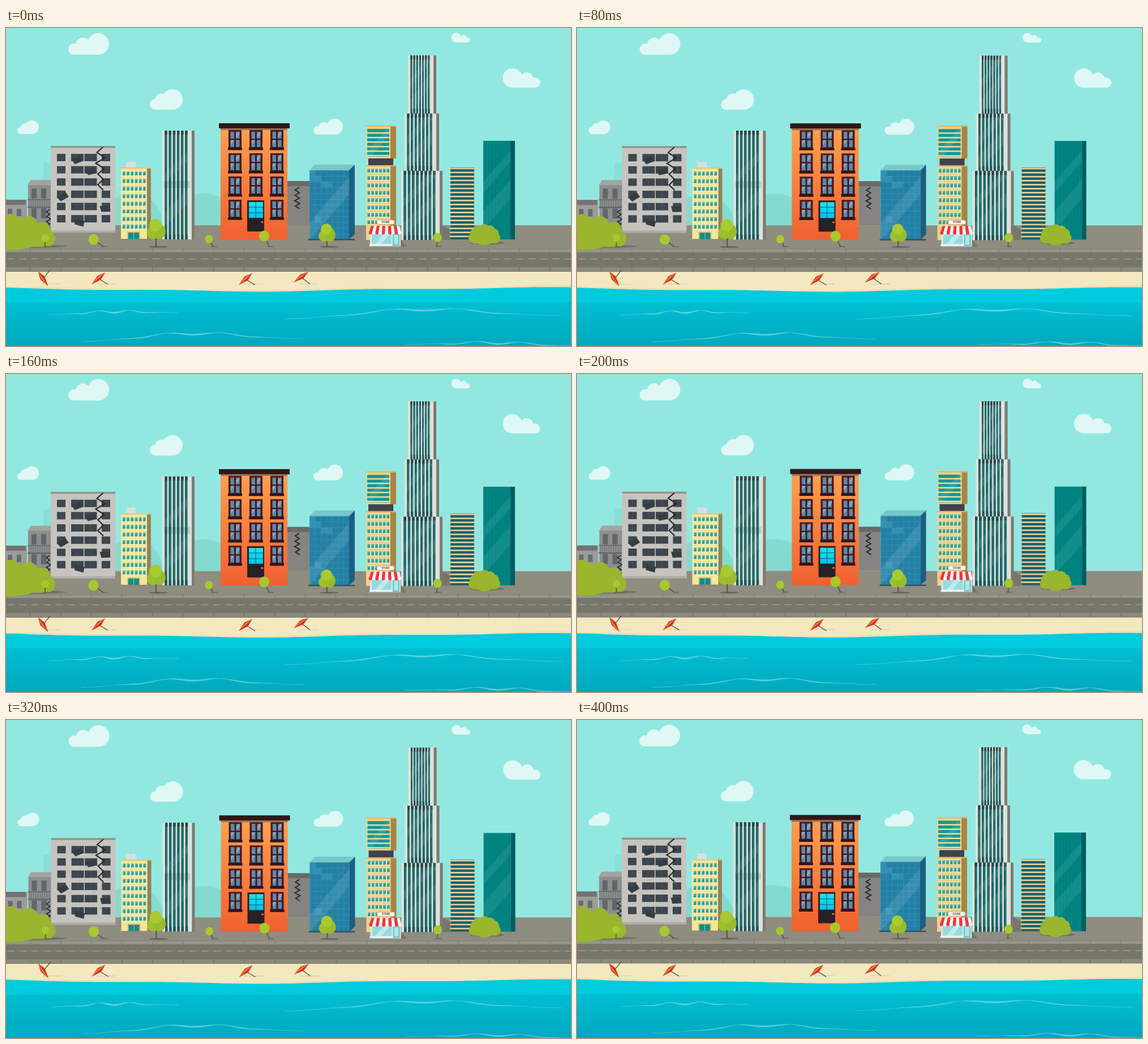
Animation, 998 px wide and 561 px high, one loop 0.44 s. Source, as an HTML page with a canvas:

```html
<!DOCTYPE html>
<html lang="en">
<head>
<meta charset="utf-8">
<title>Seaside street</title>
<style>
html, body { margin: 0; width: 100%; height: 100%; overflow: hidden; background: #92e8e0 }
canvas { display: block }
</style>
</head>
<body>
<canvas width="998" height="561"></canvas>
<script>
const c = document.querySelector('canvas').getContext('2d');
const TAU = Math.PI * 2;
let seed;

function random() {
  seed = seed * 16807 % 2147483647;
  return seed / 2147483647;
}

const rect = (x, y, w, h, fill) => { c.fillStyle = fill; c.fillRect(x, y, w, h); };
const band = (y, h, fill) => rect(-5, y, 1008, h, fill);

function trace(points) {
  c.beginPath();
  for (let i = 0; i < points.length; i += 2) c.lineTo(points[i], points[i + 1]);
}

function poly(points, fill) {
  trace(points);
  c.fillStyle = fill;
  c.fill();
}

function line(points, stroke, width = 1) {
  trace(points);
  c.strokeStyle = stroke;
  c.lineWidth = width;
  c.stroke();
}

function oval(x, y, rx, ry, fill) {
  c.beginPath();
  c.ellipse(x, y, rx, ry, 0, 0, TAU);
  c.fillStyle = fill;
  c.fill();
}

function fade(y0, y1, from, to) {
  const g = c.createLinearGradient(0, y0, 0, y1);
  g.addColorStop(0, from);
  g.addColorStop(1, to);
  return g;
}

function grid(x, y, cols, rows, dx, dy, cell) {
  for (let j = 0; j < rows; j++)
    for (let i = 0; i < cols; i++) cell(x + i * dx, y + j * dy, i, j);
}

// Diagonal reflection, clipped to a pane
function glare(x, y, w, h, at, size, alpha = .1) {
  c.save();
  c.beginPath();
  c.rect(x, y, w, h);
  c.clip();
  const a = y + at, b = a - w * 1.15;
  poly([x, a, x + w, b, x + w, b + size, x, a + size], `rgba(255,255,255,${alpha})`);
  c.restore();
}

// Three lumps on a flat base; dir -1 puts the large one on the left
function cloud(x, y, w, h, dir = 1) {
  c.save();
  c.translate(x + w / 2, y);
  c.scale(dir, 1);
  c.beginPath();
  const lump = (cx, r, cy) => {
    c.moveTo(cx - w / 2 + r, cy);
    c.arc(cx - w / 2, cy, r, 0, TAU);
  };
  lump(h * .26, h * .26, h * .74);
  lump(w * .36, h * .34, h * .55);
  lump(w - h / 2, h / 2, h / 2);
  c.rect(h * .26 - w / 2, h * .6, w - h * .76, h * .4);
  c.fillStyle = '#dff8f5';
  c.fill();
  c.restore();
}

function crack(x, y, height, sway, width) {
  seed = 11 + height;
  const points = [];
  for (let t = 0, side = 1; t <= height; t += height / 8, side = -side)
    points.push(x + side * sway * (.5 + random() / 2), y + t);
  line(points, '#272b2e', width);
}

function sky() {
  band(-5, 360, '#92e8e0');
  cloud(110, 9, 72, 38);
  cloud(254, 108, 58, 36);
  cloud(20, 163, 38, 24);
  cloud(543, 160, 52, 28);
  cloud(786.5, 8.5, 33, 17, -1);
  cloud(877.5, 71, 66, 34, -1);
  rect(66, 238, 14, 110, '#87e0d7');
  oval(222, 347, 55, 55, '#85dad0');
  oval(350, 348, 60, 56, '#85dad0');
}

function ground() {
  band(348, 42, '#8f8c80');
  band(389, 1, '#807d71');
  band(390, 6, '#95958a');
  band(395.5, 27, '#76766a');
  band(422, 8, '#8a897c');
  band(429, 1, '#77766a');
  for (let x = 2; x < 1000; x += 21.4) rect(x, 406.8, 13, 1, '#b0af9f');
  for (let x = 42; x < 1000; x += 54) {
    rect(x, 390, 1, 5.5, '#78786c');
    rect(x, 422, 1, 7, '#6c6c62');
  }
}

function shard(x, y, angle) {
  c.save();
  c.translate(x, y);
  c.rotate(angle);
  poly([-10, -4, 8, -6, 10, 4, -6, 6], '#353d44');
  c.restore();
}

function ruins() {
  rect(-5, 303, 42, 45, '#9d9c9a');
  rect(-5, 303, 40, 9, '#727372');
  grid(3, 319, 2, 1, 16, 0, (x, y) => rect(x, y, 8, 13, '#686c6e'));
  rect(39, 276, 41, 72, '#8d8e8e');
  poly([38, 277, 44, 268, 80, 268, 80, 277], '#a3a3a0');
  grid(45, 283, 2, 2, 17, 35, (x, y) => rect(x, y, 9, 18, '#60676b'));
  rect(38, 302, 41, 1.5, '#636667');
  rect(38, 315, 41, 2.5, '#636667');
  for (let x = 40; x < 79; x += 4) line([x, 303, x, 315], '#696d6e');
  crack(75, 320, 34, 4, 1.8);

  rect(497, 270, 39, 78, '#858481');
  rect(497, 270, 39, 9, '#69696a');
  crack(515, 281, 38, 6, 2);

  rect(79, 208, 114, 153, '#c7c4bf');
  rect(79, 208, 114, 3.5, '#949491');
  rect(79, 357, 114, 4, '#aeaca8');
  seed = 5;
  for (let i = 0; i < 45; i++)
    rect(81 + random() * 103, 214 + random() * 140, 7, 1, '#b5b3ae');
  for (let y = 222; y < 335; y += 21.6)
    for (const [x, w] of [[90, 15], [115, 22], [138.5, 22], [169, 15]]) {
      rect(x, y, w, 13, '#3d464e');
      line([x + w / 2, y, x + w / 2, y + 13], '#515b62', .7);
    }
  shard(126, 233, -.25);
  shard(150, 253, -.1);
  shard(100, 298, -.4);
  shard(175, 319, .1);
  shard(129, 343, .4);
  crack(167, 210, 76, 9, 2.2);
}

function smallWindow(x, y) {
  rect(x - .5, y - 1, 5.7, 9, '#ffefb9');
  rect(x, y, 4.6, 7, '#2b9c9a');
  poly([x, y, x + 4.6, y, x, y + 4], '#62bdb6');
}

function yellowBlock() {
  rect(218, 225, 1.2, 13, '#b8c9c9');
  rect(212, 236, 17, 11, '#d4e1df');
  rect(249, 246, 7, 128, '#968257');
  rect(203, 246, 46, 128, '#f4e69b');
  rect(203, 246, 53, 2, '#d9c67c');
  grid(206, 253, 6, 8, 7.2, 13.4, smallWindow);
  rect(214, 359, 23, 15, '#d4c078');
  rect(216, 361, 19, 13, '#168b89');
  line([225.5, 361, 225.5, 374], '#8ed2c9');
  rect(203, 372, 53, 2.5, '#91866a');
}

function stripedTower(x, y, w, h, bars) {
  const front = w - 5, pitch = (front - 9) / bars;
  rect(x, y, front, h, '#dfe2da');
  rect(x + front, y, 5, h, '#7d7a70');
  for (let i = 0; i < bars; i++) {
    const bx = x + 4.5 + i * pitch, bw = pitch * .6;
    rect(bx, y, bw, h, '#1b7a7b');
    rect(bx, y, bw * .4, h, '#2b5052');
    rect(bx, y, bw, 7, '#24484b');
    rect(bx, y + h - 9, bw, 9, '#22575a');
    glare(bx, y, bw, h, h * .4 - i * 7, 16);
    glare(bx, y, bw, h, h * .75 - i * 7, 25);
  }
}

function apartmentWindow(x, y) {
  rect(x - 1, y - 1, 23, 34, '#501820');
  rect(x + 2.5, y + 2, 16, 27, '#5a8ba8');
  glare(x + 2.5, y + 2, 16, 27, 16, 7, .25);
  rect(x + 9, y, 3, 30, '#451620');
  rect(x, y + 14, 21, 2.5, '#451620');
  rect(x - 2, y + 30, 25, 4.5, '#321418');
}

function orangeHouse() {
  rect(379, 177, 118, 196, fade(177, 373, '#ffa04d', '#f0602f'));
  rect(379, 177, 118, 3, '#98725a');
  rect(376, 168, 125, 9, '#2f1718');
  grid(394, 181, 3, 4, 37, 41, (x, y, i, j) => {
    if (i != 1 || j != 3) apartmentWindow(x, y);
  });
  rect(426, 304, 30, 55, '#331c20');
  rect(429, 307, 25, 28, fade(307, 335, '#19e3f4', '#00c4ec'));
  line([441, 307, 441, 335], '#1c6d80', 1.3);
  for (const y of [316, 326]) line([429, y, 454, y], '#1c6d80', 1.3);
  rect(428, 337, 26, 21, '#252126');
  oval(452.5, 342.5, 2.2, 1.6, '#eb7134');
}

function glassBlock() {
  poly([536, 251, 545, 241, 616, 241, 606, 251], '#78c7ca');
  poly([606, 251, 616, 241, 616, 364, 606, 373], '#1a5f80');
  rect(536, 251, 70, 122, '#2380a5');
  seed = 9;
  grid(536, 251, 7, 12, 10, 10.2, (x, y) => {
    rect(x, y, 10, .7, '#3b92b4');
    rect(x, y, .7, 10, '#3b92b4');
    if (random() < .12) rect(x, y, 10, 10, 'rgba(100,190,213,.25)');
  });
  glare(536, 251, 70, 122, 92, 31);
  rect(534, 372, 82, 2.5, '#345262');
}

function creamTower() {
  for (const [y, h] of [[172, 58], [242, 132]]) {
    rect(636, y, 43, h, '#efd18c');
    rect(679, y, 10, h, '#ad8342');
    rect(636, y, 53, 2, '#deb569');
  }
  rect(640, 230, 44, 12, '#42414b');
  rect(638, 178, 39, 49, '#169894');
  glare(638, 178, 39, 49, 40, 16);
  for (let y = 184; y < 228; y += 8) rect(637, y, 42, 2.4, '#f7df9f');
  grid(638.5, 248, 6, 8, 6.8, 13, smallWindow);
}

function officeBlocks() {
  rect(785, 246, 42, 127, '#1a6265');
  for (let y = 246.5; y < 373; y += 7.05) {
    rect(784, y, 44, 3, '#e0cd9d');
    rect(785, y + 3, 42, 1, '#294e51');
  }
  rect(843, 199, 48, 174, '#008582');
  rect(891, 199, 8, 174, '#005e61');
  for (let x = 846; x < 890; x += 6) rect(x, 207, 2, 166, 'rgba(0,93,97,.15)');
  glare(843, 199, 48, 174, 72, 20, .08);
  glare(843, 199, 48, 174, 124, 33, .08);
}

function store() {
  poly([697, 373, 708, 386, 640, 386], '#77766c');
  rect(643, 359, 54, 26, '#d8f0ee');
  rect(646, 363, 35, 18, '#96dcdc');
  glare(646, 363, 35, 18, 25, 12, .4);
  rect(683, 363, 12, 21, '#63bcc0');
  rect(685, 365, 8, 17, '#aee7e4');
  rect(642, 381, 41, 4, '#edf3f0');
  rect(641, 384.5, 57, 1.5, '#a2aaa6');
  for (let i = 0; i < 10; i++) {
    const x = 641 + i * 5.7, top = 645 + i * 5;
    const fill = i % 2 ? '#fff4ee' : '#ed3546';
    poly([top, 349, top + 5, 349, x + 5.7, 361, x, 361], fill);
    oval(x + 2.85, 361, 2.85, 3.2, fill);
  }
  c.beginPath();
  c.roundRect(655, 338.5, 31, 8, 3);
  c.fillStyle = '#fff7e8';
  c.fill();
  c.strokeStyle = '#c19b75';
  c.lineWidth = 1;
  c.stroke();
  c.fillStyle = '#61433c';
  c.font = 'bold 4.5px Roboto, sans-serif';
  c.textAlign = 'center';
  c.fillText('STORE', 670.5, 344.2);
}

function roundTree(x, y, r, lean) {
  line([x + lean - 3, 385.5, x + lean + 8, 385.5], '#66675d', 1.5);
  line([x, y, x + lean, 385.5], '#5c5439', 1.6);
  oval(x, y, r, r * 1.06, '#a7c92f');
}

function tallTree(x, y, size) {
  oval(x + 5, 386, 17, 1.6, '#66675d');
  line([x, y, x + 1, 386], '#5e5639', 2);
  oval(x - size * .4, y + size * 2.2, size, size, '#9fbf2e');
  oval(x + size * .6, y + size * 2, size, size * 1.2, '#9abb2d');
  oval(x, y + size, size, size, '#a8cb31');
}

// Lumps set along a half ellipse, filled down to the ground
function bush(x, y, w, h, r) {
  const fill = '#99b62e';
  oval(x + w * .15, y - 1, w * 1.1, 3, '#6f6f65');
  oval(x, y - h * .4, w - r, h * .5, fill);
  for (let i = 0; i <= 6; i++) {
    const a = Math.PI * i / 6;
    oval(x + Math.cos(a) * (w - r), y - r - Math.sin(a) * (h - 2 * r), r, r, fill);
  }
  rect(x - w + r, y - r, 2 * (w - r), r, fill);
}

function plants() {
  bush(8, 386, 79, 58, 15);
  roundTree(69, 370.5, 6.5, 0);
  roundTree(154.5, 373, 9, 17);
  tallTree(264, 337, 11);
  roundTree(358.5, 372.5, 7, 7);
  roundTree(456, 367, 9, 9);
  tallTree(566, 345, 10);
  roundTree(762, 369.5, 7.5, -1);
  bush(845, 380, 28, 34, 9.5);
}

function parasol(x, y, turn = 0) {
  line([x - 3, 451.5, x + 31, 451.5], '#ddd1a8', 1.3);
  c.save();
  c.translate(x, y);
  c.rotate(turn - .72);
  line([0, 0, 6, 19], '#4d4338', 1.2);
  poly([-16, 0, 2, -4.5, 16, 0, 2, 4.5], '#d8301f');
  poly([-16, 0, 2, -2.5, 16, 0, 2, 0], '#f1843a');
  c.restore();
}

const shoreline = x => 461.2 + 3 * Math.cos((x - 420) * TAU / 1020) + 1.1 * Math.cos((x - 800) * TAU / 340);

function water(rise, fill) {
  const points = [1003, 570, -5, 570];
  for (let x = -5; x <= 1003; x += 8) points.push(x, shoreline(x) - rise(x));
  poly(points, fill);
}

// Tapered wave crest: an arch between two ends with a small ripple on it
function ripple(x0, y0, x1, y1, height) {
  const upper = [], lower = [];
  for (let u = 0; u <= 1.001; u += .02) {
    const swell = Math.sin(Math.PI * u) ** 2;
    const x = x0 + (x1 - x0) * u;
    const y = y0 + (y1 - y0) * u - swell * (height + 2.5 * Math.cos(TAU * 4 * (u - .38)));
    const half = .3 + 1.2 * swell * Math.abs(Math.cos(TAU * 2 * u));
    upper.push(x, y - half);
    lower.unshift(x, y + half);
  }
  poly([...upper, ...lower], 'rgba(190,240,245,.45)');
}

function beach() {
  band(430, 40, '#f3e8bf');
  parasol(65.5, 442.5, -1.45);
  parasol(163, 442);
  parasol(423, 443);
  parasol(521, 439.5, .1);
  water(x => 2 + Math.sin(x / 70), '#eadfb1');
  water(x => Math.max(0, Math.sin(x / 95)), '#d3ecd2');
  water(() => 0, '#00cbdc');
  band(484, 82, fade(484, 561, '#00bed3', '#00a9be'));
  ripple(76, 506, 304, 502, 4);
  ripple(492, 513, 981, 507, 14);
  ripple(133, 553, 527, 548, 12);
  ripple(705, 558, 1030, 562, 5);
}

function scene() {
  sky();
  ground();
  ruins();
  yellowBlock();
  stripedTower(276, 181, 57, 192, 6);
  rect(279, 270, 46, 12, 'rgba(25,68,72,.15)');
  orangeHouse();
  glassBlock();
  creamTower();
  stripedTower(710, 48.5, 50, 103, 7);
  stripedTower(704, 151, 61, 101, 7);
  stripedTower(698, 252, 73, 122, 8);
  poly([771, 348, 784, 356, 784, 374, 771, 374], '#78766c');
  officeBlocks();
  store();
  plants();
  beach();
}

// Camera tremble in 40 ms steps, eleven steps per loop
function frame() {
  const step = Math.floor(performance.now() / 40) % 11;
  const dx = .2 + .35 * Math.cos(TAU * (step - 2) / 3);
  const dy = Math.min(1, step) * (-.05 - .4 * Math.cos(TAU * step / 5));
  c.setTransform(1, 0, 0, 1, dx, dy);
  scene();
  requestAnimationFrame(frame);
}
frame();
</script>
</body>
</html>
```
